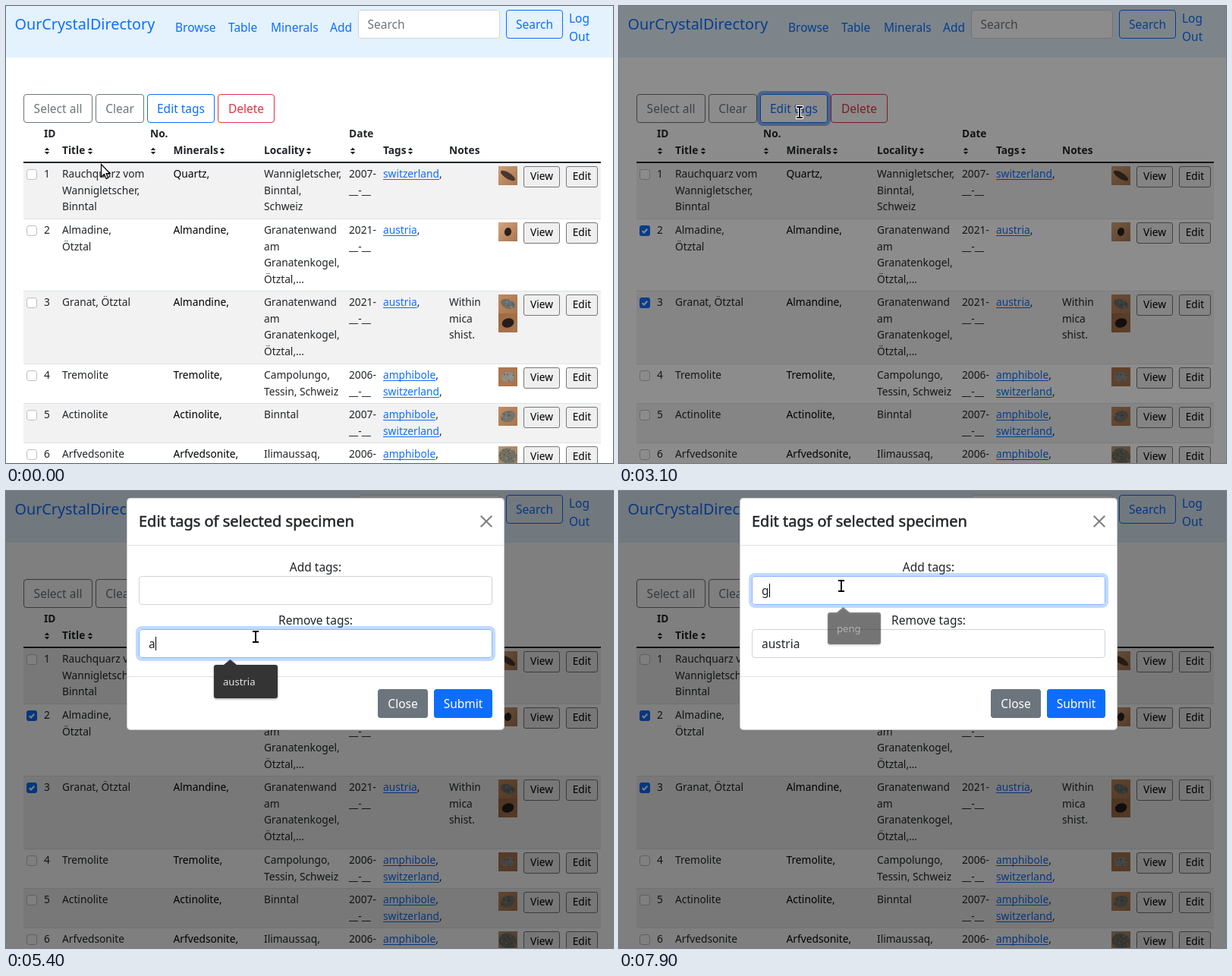
Recreate the animation shown at these times as an HTML page with a canvas. Size 800x602 px, loop 8 s.

```html
<!DOCTYPE html>
<html lang="en">
<head>
<meta charset="utf-8">
<title>Mineral table</title>
<style>
html, body { margin: 0; width: 100%; height: 100%; overflow: hidden; background: #fff; }
canvas { display: block; }
</style>
</head>
<body>
<canvas id="stage" width="800" height="602"></canvas>
<script>
const ctx = document.getElementById('stage').getContext('2d');
const LOOP = 8000, STEP = 100;
const FAMILY = '"Noto Sans", "Open Sans", sans-serif';
const BODY = `15.5px ${FAMILY}`, CELL = `13.75px ${FAMILY}`, HEAD = `bold 13.7px ${FAMILY}`;
const INK = '#212529', BLUE = '#0d6efd', GRAY = '#6c757d', RED = '#dc3545', RULE = '#dee2e6';
const COL = { id: 50, title: 74, minerals: 220.5, locality: 340, date: 452, tags: 497, notes: 584 };

const rows = [
  { top: 207, title: ['Rauchquarz vom', 'Wannigletscher,', 'Binntal'], mineral: 'Quartz,',
    place: ['Wannigletscher,', 'Binntal,', 'Schweiz'], year: 2007, tags: ['switzerland'] },
  { top: 281, title: ['Almadine,', 'Ötztal'], mineral: 'Almandine,',
    place: ['Granatenwand', 'am', 'Granatenkogel,', 'Ötztal,…'], year: 2021, tags: ['austria'] },
  { top: 376, title: ['Granat, Ötztal'], mineral: 'Almandine,',
    place: ['Granatenwand', 'am', 'Granatenkogel,', 'Ötztal,…'], year: 2021, tags: ['austria'],
    notes: ['Within', 'mica', 'shist.'] },
  { top: 472, title: ['Tremolite'], mineral: 'Tremolite,',
    place: ['Campolungo,', 'Tessin, Schweiz'], year: 2006, tags: ['amphibole', 'switzerland'] },
  { top: 524, title: ['Actinolite'], mineral: 'Actinolite,',
    place: ['Binntal'], year: 2007, tags: ['amphibole', 'switzerland'] },
  { top: 576, title: ['Arfvedsonite'], mineral: 'Arfvedsonite,',
    place: ['Ilimaussaq,'], year: 2006, tags: ['amphibole'] }
];

// Top, backdrop, stone colour, half width, half height, tilt, speckled
const thumbs = [
  [211, '#cda078', '#49372d', 11, 4, .55, false],
  [285, '#d3a67e', '#29221f', 4.5, 5.5, .2, false],
  [380, '#c08a5c', '#6b6e69', 10, 6, .35, true],
  [405, '#9c6a45', '#251d1a', 8, 6, -.3, false],
  [476, '#ad7750', '#8f8c85', 8.5, 7, 0, true],
  [528, '#c28c62', '#74746c', 10, 7.5, -.3, true],
  [580, '#b59a7c', '#707064', 12, 10, .2, true]
];

// Cursor way points: time, x, y
const arrowPath = [
  [0, 125, 208], [100, 131, 212], [200, 135, 230], [300, 124, 268], [400, 96, 306],
  [500, 64, 320], [600, 42, 307], [700, 37, 297], [1000, 37, 297], [1100, 38, 304],
  [1300, 38, 348], [1500, 37, 381], [1600, 36, 386], [1700, 36, 386], [1800, 36, 388],
  [1900, 36, 388], [2000, 42, 380], [2200, 128, 276], [2300, 184, 212], [2400, 216, 187]
];
const beamPath = [
  [3100, 238, 140], [3300, 241, 188], [3500, 268, 197], [3700, 311, 195], [3900, 329, 192],
  [6700, 329, 192], [6900, 318, 168], [7100, 296, 129], [7200, 293, 125]
];

function along(path, t) {
  const i = path.findIndex(p => p[0] >= t);
  if (i < 0) return path[path.length - 1].slice(1);
  if (i === 0) return path[0].slice(1);
  const [a, b] = [path[i - 1], path[i]], k = (t - a[0]) / (b[0] - a[0]);
  return [a[1] + (b[1] - a[1]) * k, a[2] + (b[2] - a[2]) * k].map(Math.round);
}

function write(str, x, y, font = BODY, color = INK, align = 'left') {
  ctx.font = font;
  ctx.fillStyle = color;
  ctx.textAlign = align;
  ctx.fillText(str, x, y);
  return ctx.measureText(str).width;
}

function writeLines(lines, x, y, color) {
  lines.forEach((s, i) => write(s, x, Math.round(y + i * 21.6), CELL, color));
}

function fillRect(x, y, w, h, color) {
  ctx.fillStyle = color;
  ctx.fillRect(x, y, w, h);
}

function box(x, y, w, h, r, fill, border) {
  ctx.beginPath();
  ctx.roundRect(x, y, w, h, r);
  if (fill) { ctx.fillStyle = fill; ctx.fill(); }
  if (!border) return;
  ctx.beginPath();
  ctx.roundRect(x + .5, y + .5, w - 1, h - 1, Math.max(r - .5, 0));
  ctx.strokeStyle = border;
  ctx.lineWidth = 1;
  ctx.stroke();
}

function ring(x, y, w, h, r, strength) {
  ctx.beginPath();
  ctx.roundRect(x - 2, y - 2, w + 4, h + 4, r + 2);
  ctx.strokeStyle = `rgba(13,110,253,${strength})`;
  ctx.lineWidth = 4;
  ctx.stroke();
}

function polyline(points, color, width) {
  ctx.beginPath();
  points.forEach(p => ctx.lineTo(...p));
  ctx.strokeStyle = color;
  ctx.lineWidth = width;
  ctx.stroke();
}

function button(label, x, y, w, color, fill) {
  box(x, y, w, 38, 4, fill, color);
  write(label, x + w / 2, y + 25, BODY, fill ? '#fff' : color, 'center');
}

function sortMark(x) {
  ctx.fillStyle = INK;
  for (const d of [-1, 1]) {
    ctx.beginPath();
    ctx.moveTo(x - 3.2, 191 + d);
    ctx.lineTo(x + 3.2, 191 + d);
    ctx.lineTo(x, 191 + d * 4.5);
    ctx.fill();
  }
}

function checkbox(y, checked, focused) {
  if (focused) ring(27, y, 14, 14, 3.5, .25);
  const border = focused ? '#86b7fe' : 'rgba(0,0,0,.25)';
  box(27, y, 14, 14, 3.5, checked ? BLUE : '#fff', checked ? BLUE : border);
  if (checked) polyline([[30.7, y + 7.2], [33, y + 9.5], [37.3, y + 4.8]], '#fff', 2);
}

function thumbnail([y, back, stone, rx, ry, tilt, speckled], seed) {
  ctx.save();
  ctx.beginPath();
  ctx.rect(649, y, 25, 25);
  ctx.clip();
  const shade = ctx.createLinearGradient(649, y, 674, y + 25);
  shade.addColorStop(0, back);
  shade.addColorStop(1, '#a9754d');
  fillRect(649, y, 25, 25, shade);
  ctx.beginPath();
  ctx.ellipse(661.5, y + 12.5, rx, ry, tilt, 0, 7);
  ctx.fillStyle = stone;
  ctx.fill();
  ctx.clip();
  for (let i = 0; speckled && i < 26; i++) {
    const a = Math.abs(Math.sin(i * 12.9 + seed) * 439) % 1;
    const b = Math.abs(Math.sin(i * 78.2 + seed) * 527) % 1;
    fillRect(649 + a * 24, y + b * 24, 1.5, 1.5, i % 2 ? '#a3a198' : '#4e4d47');
  }
  ctx.restore();
}

function drawNav() {
  fillRect(0, 0, 800, 68, '#e3f2fd');
  write('OurCrystalDirectory', 11.5, 31, `19.8px ${FAMILY}`, BLUE);
  [['Browse', 223], ['Table', 293], ['Minerals', 349], ['Add', 427]]
    .forEach(([s, x]) => write(s, x, 34, BODY, BLUE));
  box(464, 5, 187, 38, 4, '#fff', '#ced4da');
  write('Search', 476.5, 30, BODY, GRAY);
  button('Search', 659, 5, 75, BLUE);
  write('Log', 742, 22, BODY, BLUE);
  write('Out', 742, 46, BODY, BLUE);
}

function drawRow(row, i, t) {
  const { top } = row, y = top + 19;
  const bottom = i < 5 ? rows[i + 1].top - 1 : 602;
  if (i % 2 === 0) fillRect(23, top, 761, bottom - top, '#f2f2f2');
  if (i < 5) fillRect(23, bottom, 761, 1, RULE);
  const checked = (i === 1 && t >= 1000) || (i === 2 && t >= 1800);
  const focused = (i === 1 && t >= 1000 && t < 1800) || (i === 2 && t >= 1800 && t < 3100);
  checkbox(top + 8, checked, focused);
  write(String(i + 1), COL.id, y, CELL);
  writeLines(row.title, COL.title, y);
  write(row.mineral, COL.minerals, y, CELL, '#000');
  writeLines(row.place, COL.locality, y);
  writeLines([row.year + '-', '__-__'], COL.date, y);
  writeLines(row.notes || [], COL.notes, y);
  row.tags.forEach((tag, n) => {
    const ty = Math.round(y + n * 21.6);
    const w = write(tag, COL.tags, ty, CELL, BLUE);
    fillRect(COL.tags, ty + 2, w, 1, BLUE);
    write(',', COL.tags + w, ty, CELL);
  });
  [['View', 682, 48], ['Edit', 738, 42]].forEach(([s, x, w]) => {
    box(x, top + 4, w, 28, 3, '#efefef', '#767676');
    write(s, x + w / 2, top + 22, CELL, '#000', 'center');
  });
}

function drawPage(t) {
  fillRect(0, 0, 800, 602, '#fff');
  drawNav();
  button('Select all', 23, 116, 91, GRAY);
  button('Clear', 118, 116, 64, GRAY);
  button('Edit tags', 186, 116, 89, BLUE);
  button('Delete', 279, 116, 75, RED);
  if (t >= 3100) ring(186, 116, 89, 38, 4, .5);

  [['ID', 50], ['No.', 190], ['Date', 452]].forEach(([s, x]) => write(s, x, 173, HEAD));
  [['Title', 74], ['Minerals', 220.5], ['Locality', 340], ['Tags', 497], ['Notes', 584]]
    .forEach(([s, x]) => write(s, x, 195, HEAD));
  [54, 111, 194, 285, 399, 457, 533].forEach(sortMark);
  fillRect(23, 205, 761, 2, INK);
  rows.forEach((row, i) => drawRow(row, i, t));
  thumbs.forEach(thumbnail);
}

function field(y, value, focus, caret) {
  if (focus) ring(175, y, 466, 38, 4, .25 * focus);
  box(175, y, 466, 38, 4, '#fff', focus ? '#86b7fe' : '#ced4da');
  const w = write(value, 188, y + 25);
  if (caret) fillRect(Math.round(188 + w), y + 10, 1, 18, '#000');
}

function removeText(t) {
  const typed = [[6500, 7], [6400, 6], [6200, 5], [6000, 4], [5800, 3], [5400, 1]];
  const hit = typed.find(([start]) => t >= start);
  return 'austria'.slice(0, hit ? hit[1] : 0);
}

function drawModal(t) {
  const rise = t >= 3400 ? 0 : t >= 3300 ? -4 : -23;
  ctx.save();
  ctx.translate(0, rise);
  ctx.globalAlpha = t >= 3300 ? 1 : .73;
  box(159, 9, 498, 306, 5, '#fff', 'rgba(0,0,0,.2)');
  fillRect(160, 71, 496, 1, RULE);
  fillRect(160, 244, 496, 1, RULE);

  const title = 'Edit tags of selected specimen';
  write(title, 175, 47, `20px ${FAMILY}`);
  ctx.strokeStyle = INK;
  ctx.lineWidth = .5;
  ctx.strokeText(title, 175, 47);
  polyline([[625.7, 32.7], [640.3, 47.3]], '#7f7f7f', 2);
  polyline([[640.3, 32.7], [625.7, 47.3]], '#7f7f7f', 2);

  write('Add tags:', 408, 106, BODY, INK, 'center');
  write('Remove tags:', 408, 176, BODY, INK, 'center');
  const addFocus = t >= 7500 ? 1 : t >= 7400 ? .6 : 0;
  const removeFocus = t < 4000 ? 0 : 1 - addFocus;
  const removeCaret = (t >= 4000 && t < 4400) || (t >= 5000 && t < 7100);
  field(112, t >= 7800 ? 'g' : '', addFocus, addFocus > 0);
  field(182, removeText(t), removeFocus, removeCaret);
  button('Close', 490, 261, 66, GRAY, GRAY);
  button('Submit', 564, 261, 77, BLUE, BLUE);
  ctx.restore();
}

function popup(label, y, w, alpha) {
  const inset = alpha < 1 ? 1 : 0, x = 274 + inset;
  ctx.save();
  ctx.globalAlpha = alpha;
  ctx.beginPath();
  ctx.roundRect(x, y + inset, w - 2 * inset, 44 - 2 * inset, 3);
  ctx.moveTo(287, y + inset);
  ctx.lineTo(295.5, y - 7 + inset);
  ctx.lineTo(304, y + inset);
  ctx.shadowColor = 'rgba(0,0,0,.4)';
  ctx.shadowBlur = 3;
  ctx.shadowOffsetY = 1;
  ctx.fillStyle = '#343434';
  ctx.fill();
  ctx.shadowColor = 'transparent';
  write(label, 286 + inset, y + 27, `13.1px ${FAMILY}`, '#e4e4e4');
  ctx.restore();
}

function drawArrow(x, y) {
  ctx.beginPath();
  [[0, 0], [0, 16.5], [4, 13], [6.6, 19], [9.2, 18], [6.6, 12], [11.5, 12]]
    .forEach(([dx, dy]) => ctx.lineTo(x + .5 + dx, y + .5 + dy));
  ctx.closePath();
  ctx.fillStyle = '#fff';
  ctx.fill();
  ctx.strokeStyle = '#000';
  ctx.lineWidth = 1.2;
  ctx.stroke();
}

function drawBeam(x, y) {
  for (const [grow, color] of [[1, '#fff'], [0, '#000']]) {
    fillRect(x - 1 - grow, y - 7 - grow, 2 + 2 * grow, 15 + 2 * grow, color);
    for (const dy of [-8, 6])
      fillRect(x - 4 - grow, y + dy - grow, 8 + 2 * grow, 2 + 2 * grow, color);
  }
}

function drawCursor(t) {
  if (t < 3100) return drawArrow(...along(arrowPath, t));
  const [x, y] = along(beamPath, t);
  const betweenFields = t > 3400 && y > 150 && y < 182;
  (betweenFields ? drawArrow : drawBeam)(x, y);
}

function draw(t) {
  drawPage(t);
  if (t >= 3100) fillRect(0, 0, 800, 602, `rgba(0,0,0,${t >= 3200 ? .5 : .45})`);
  if (t >= 3200) drawModal(t);
  if (t >= 5400 && t < 6600) popup('austria', 229, 84, t >= 6500 ? .33 : 1);
  if (t >= 7900) popup('peng', 159, 72, .56);
  drawCursor(t);
}

const start = performance.now();
function tick() {
  const t = (performance.now() - start) % LOOP;
  draw(Math.floor(t / STEP) * STEP);
  requestAnimationFrame(tick);
}
tick();
</script>
</body>
</html>
```
